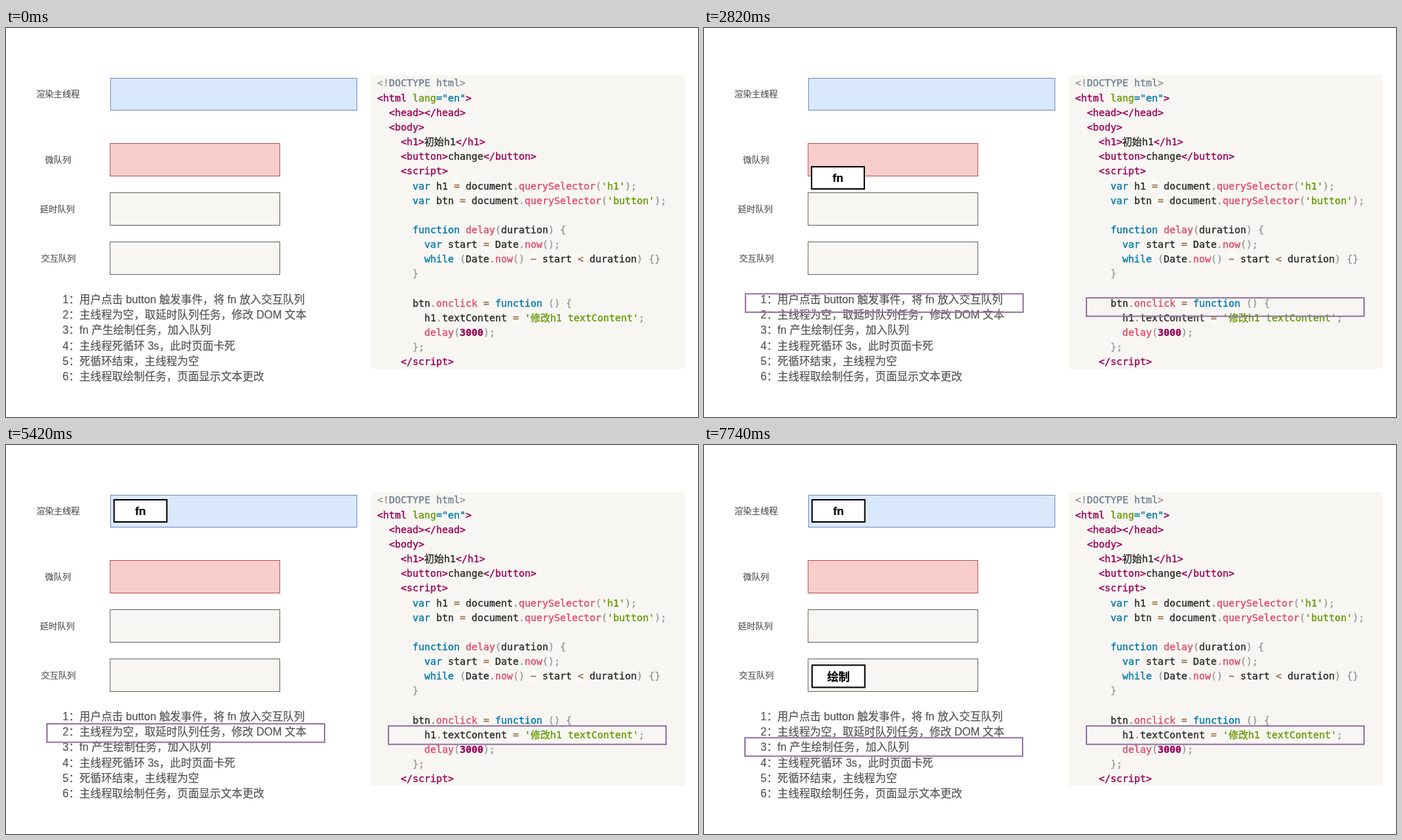
An HTML page with a canvas for the animation above (8 s loop, 997 by 561 pixels).

```html
<!DOCTYPE html>
<html lang="zh-CN">
<head>
<meta charset="utf-8">
<style>
  html, body { margin: 0; width: 100%; height: 100%; overflow: hidden; background: #fff; }
  canvas { display: block; width: 997px; height: 561px; }
</style>
</head>
<body>
<canvas id="stage"></canvas>
<script>
const W = 997, H = 561, LOOP = 8000, STEP = 40, PHASE = 20;
const CJK = '"Noto Sans CJK SC", "Noto Sans CJK JP", "Noto Sans CJK", sans-serif';
const SANS = `"Liberation Sans", ${CJK}`;
const MONO = `14.13px "DejaVu Sans Mono", ${CJK}`;
const PURPLE = '#9673a6';

const canvas = document.getElementById('stage');
const ctx = canvas.getContext('2d');
const ratio = window.devicePixelRatio || 1;
canvas.width = Math.round(W * ratio);
canvas.height = Math.round(H * ratio);

const LANES = [
  ['渲染主线程', 75, 95.5, 150.6, 72.5, 355, 46, '#dae8fc', '#6c8ebf'],
  ['微队列', 75, 190, 150, 166.5, 244.5, 47, '#f8cecc', '#b85450'],
  ['延时队列', 74, 261.5, 150, 237.5, 244.5, 47, '#f7f6f2', '#666666'],
  ['交互队列', 75.5, 332, 150, 308.5, 244.5, 47, '#f7f6f2', '#666666'],
];

const NOTES = [
  '1：用户点击 button 触发事件，将 fn 放入交互队列',
  '2：主线程为空，取延时队列任务，修改 DOM 文本',
  '3：fn 产生绘制任务，加入队列',
  '4：主线程死循环 3s，此时页面卡死',
  '5：死循环结束，主线程为空',
  '6：主线程取绘制任务，页面显示文本更改',
];

// Each code segment begins with the key of its colour.
const INK = {
  d: '#2c2a26', p: '#999999', t: '#990055', n: '#990055', a: '#669900',
  k: '#0077aa', f: '#dd4a68', o: '#9a6e3a', c: '#708090',
};
const CODE = [
  'p<!|cDOCTYPE html|p>',
  't<html |alang|k="en"|t>',
  't  <head></head>',
  't  <body>',
  't    <h1>|d初始h1|t</h1>',
  't    <button>|dchange|t</button>',
  't    <script>',
  'k      var|d h1 |o=|d document|p.|fquerySelector|p(|a\'h1\'|p);',
  'k      var|d btn |o=|d document|p.|fquerySelector|p(|a\'button\'|p);',
  '',
  'k      function|f delay|p(|dduration|p) {',
  'k        var|d start |o=|d Date|p.|fnow|p();',
  'k        while|p (|dDate|p.|fnow|p() |o-|d start |o<|d duration|p) {}',
  'p      }',
  '',
  'd      btn|p.|fonclick|d |o=|k function|p () {',
  'd        h1|p.|dtextContent |o=|d |a\'修改h1 textContent\'|p;',
  'f        delay|p(|n3000|p);',
  'p      };',
  't    <\/script>',
];

// A fine outline gives the text its slightly heavier weight.
function write(text, x, y, font, color, align = 'left', outline = 0.2) {
  ctx.font = font;
  ctx.fillStyle = ctx.strokeStyle = color;
  ctx.lineWidth = outline;
  ctx.textAlign = align;
  ctx.fillText(text, x, y);
  ctx.strokeText(text, x, y);
}

function drawLanes() {
  for (const [label, cx, cy, x, y, w, h, fill, stroke] of LANES) {
    write(label, cx, cy + 4.7, `12.5px ${CJK}`, '#555555', 'center');
    ctx.fillStyle = fill;
    ctx.fillRect(x, y, w, h);
    ctx.strokeStyle = stroke;
    ctx.lineWidth = 1;
    ctx.strokeRect(x, y, w, h);
  }
}

function drawCode() {
  ctx.fillStyle = '#f7f6f3';
  ctx.fillRect(525.5, 68, 452.5, 423.5);
  CODE.forEach((line, row) => {
    const y = 84.4 + row * 21.16;
    let x = 534.7;
    for (const part of line.split('|').filter(Boolean)) {
      const key = part[0], text = part.slice(1).replace('-', '−');
      const font = key === 'n' ? 'bold ' + MONO : MONO;
      ctx.font = font;
      const width = ctx.measureText(text).width;
      if (key === 'o') {
        ctx.fillStyle = 'rgba(255,255,255,.5)';
        ctx.fillRect(x, y - 13, width, 16.5);
      }
      write(text, x, y, font, INK[key], 'left', 0.35);
      x += width;
    }
  });
}

// Cubic Bézier (.42, 0, 1, 1), solved for time by bisection.
function easeIn(u) {
  if (u <= 0) return 0;
  if (u >= 1) return 1;
  let lo = 0, hi = 1;
  for (let i = 0; i < 30; i++) {
    const s = (lo + hi) / 2;
    const x = 1.26 * s * (1 - s) ** 2 + 3 * s * s - 2 * s ** 3;
    if (x < u) lo = s; else hi = s;
  }
  return 3 * lo * lo - 2 * lo ** 3;
}

const span = (t, from, to) => Math.min(1, Math.max(0, (t - from) / (to - from)));
const mix = (a, b, k) => a + (b - a) * k;

function marker(x, y) {
  ctx.strokeStyle = PURPLE;
  ctx.lineWidth = 2;
  ctx.strokeRect(x + 1, y + 1, 400, 26.5);
}

function task(text, x, y) {
  ctx.fillStyle = '#fff';
  ctx.fillRect(x, y, 78, 34);
  ctx.strokeStyle = '#000';
  ctx.lineWidth = 2;
  ctx.strokeRect(x + 1, y + 1, 76, 32);
  write(text, x + 39, y + 23, `bold 16.3px ${SANS}`, '#000', 'center');
}

function draw(t) {
  ctx.setTransform(ratio, 0, 0, ratio, 0, 0);
  ctx.globalAlpha = 1;
  ctx.fillStyle = '#fff';
  ctx.fillRect(0, 0, W, H);
  drawLanes();
  NOTES.forEach((note, i) =>
    write(note, 81.5, 397 + i * 22.2, `15.67px ${SANS}`, '#555555'));
  drawCode();

  const rise = easeIn(span(t, 1500, 4380));
  const next = easeIn(span(t, 4940, 7740));
  ctx.globalAlpha = span(t, 470, 1020);
  marker(mix(59, 58, rise), mix(375.7, 400.2, rise) + 21 * next);
  marker(550, mix(382.2, 404.2, rise));
  task('fn', mix(153.7, 154.7, rise), mix(244.3, 78, rise));

  ctx.globalAlpha = span(t, 7220, 7740);
  task('绘制', 154.7, 316.5);
}

const start = performance.now();
function tick() {
  const t = (performance.now() - start) % LOOP;
  draw(Math.floor((t - PHASE) / STEP) * STEP + PHASE);
  requestAnimationFrame(tick);
}
tick();
</script>
</body>
</html>
```
